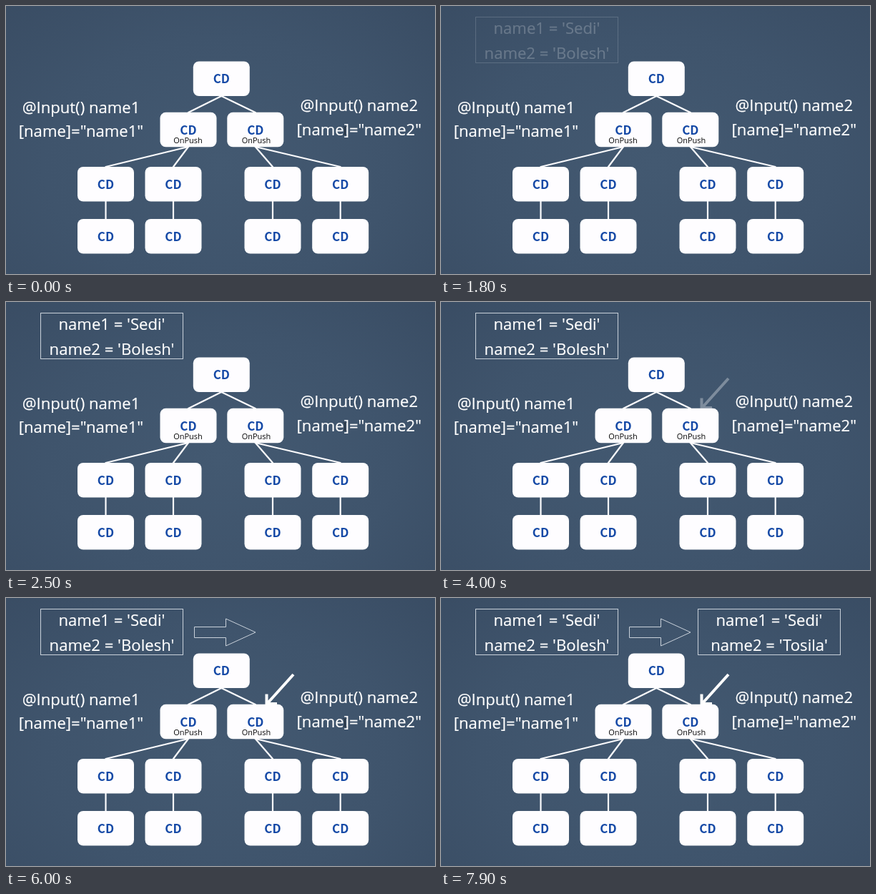
Animation of 600 by 375 pixels, one loop 8 s. Source, as an HTML page:

```html
<!DOCTYPE html>
<html lang="en">
<head>
<meta charset="utf-8">
<title>OnPush change detection</title>
<style>
  html, body { margin: 0; width: 100%; height: 100%; overflow: hidden; }
  body { background: radial-gradient(ellipse 75% 85% at 50% 58%, #435971, #3f546c 55%, #394c63); }
  svg { display: block; width: 600px; height: 375px; }
  text { text-anchor: middle; fill: #fff; font: 22.1px "Open Sans", "Noto Sans", sans-serif; }
  .light { stroke: #fff; stroke-width: .2; }
  .cd { fill: #1549a6; font: bold 17px "Noto Sans CJK JP", "Noto Sans CJK SC", "Noto Sans", sans-serif; }
  .tag { fill: #060607; font-size: 11px; }
  .node { fill: #fefdff; }
  .link { stroke: #fbfbfd; stroke-width: 2.2; stroke-linecap: round; }
  .thin { fill: none; stroke: #c9d1da; stroke-width: 1; }
  .pointer { fill: none; stroke: #fff; stroke-width: 4; }
  .caret { fill: none; stroke: #15181d; stroke-width: 1; opacity: .55; }
</style>
</head>
<body>
<svg id="stage" viewBox="0 0 600 375"></svg>
<script>
const LOOP = 8000, STEP = 100;
const stage = document.getElementById('stage');

function add(parent, tag, attrs, text) {
  const el = document.createElementNS('http://www.w3.org/2000/svg', tag);
  for (const key in attrs) el.setAttribute(key, attrs[key]);
  if (text) el.textContent = text;
  parent.append(el);
  return el;
}

const label = (parent, x, y, text, cls = 'light') => add(parent, 'text', { x, y, class: cls }, text);
const path = (parent, d, cls) => add(parent, 'path', { d, class: cls });
const link = (x1, y1, x2, y2) => add(stage, 'line', { x1, y1, x2, y2, class: 'link' });

function node(cx, top, tagX) {
  add(stage, 'rect', { x: cx - 39.5, y: top, width: 79, height: 48.5, rx: 8, class: 'node' });
  label(stage, cx, top + 30.7, 'CD', 'cd');
  if (tagX) label(stage, tagX, 192, 'OnPush', 'tag');
}

function values(x, first, second) {
  const g = add(stage, 'g', {});
  add(g, 'rect', { x: x + .5, y: 15.5, width: 199, height: 64, class: 'thin' });
  label(g, x + 100, 39, `name1 = '${first}'`);
  label(g, x + 100, 73.5, `name2 = '${second}'`);
  return g;
}

// Fades in from opacity `low` to 1 in hard 100 ms steps.
function fadeIn(el, start, count, low) {
  const frames = [{ offset: 0, opacity: 0 }];
  for (let i = 0; i < count; i++) {
    frames.push({
      offset: (start + i * STEP) / LOOP,
      opacity: low + (1 - low) * i / (count - 1)
    });
  }
  frames.push({ offset: 1, opacity: 1 });
  frames.forEach(f => f.easing = 'steps(1, end)');
  el.animate(frames, { duration: LOOP, iterations: Infinity });
}

// Tree
const parents = [[255, [139.5, 234]], [348.8, [373, 467.7]]];
for (const [px, kids] of parents) {
  link(301.3, 126, px, 149);
  for (const kx of kids) {
    link(px, 197, kx, 225);
    link(kx, 273, kx, 298);
  }
}
node(301.3, 77.5);
for (const [px, kids] of parents) {
  node(px, 148.8, px === 255 ? 254.5 : 350);
  for (const kx of kids) {
    node(kx, 225);
    node(kx, 298);
  }
}

// Inputs
label(stage, 105, 150, '@Input() name1');
label(stage, 105, 182.5, '[name]="name1"');
label(stage, 493.8, 147, '@Input() name2');
label(stage, 493.8, 181, '[name]="name2"');
path(stage, 'M471.5 168.5q2.5 0 2.5 2v8q0 2-2.5 2M476.5 168.5q-2.5 0-2.5 2v8q0 2 2.5 2', 'caret');

// Parts that appear
const before = values(48, 'Sedi', 'Bolesh');
const pointer = path(stage, 'M402 107L366 147M364.5 134.5V148H379', 'pointer');
const change = path(stage, 'M263.5 40.5H307.5V29L349 48L307.5 67V55.5H263.5Z', 'thin');
const after = values(359, 'Sedi', 'Tosila');

fadeIn(before, 1800, 8, .22);
fadeIn(pointer, 3800, 9, .1);
fadeIn(change, 5800, 3, .5);
fadeIn(after, 7400, 6, .65);
</script>
</body>
</html>
```
